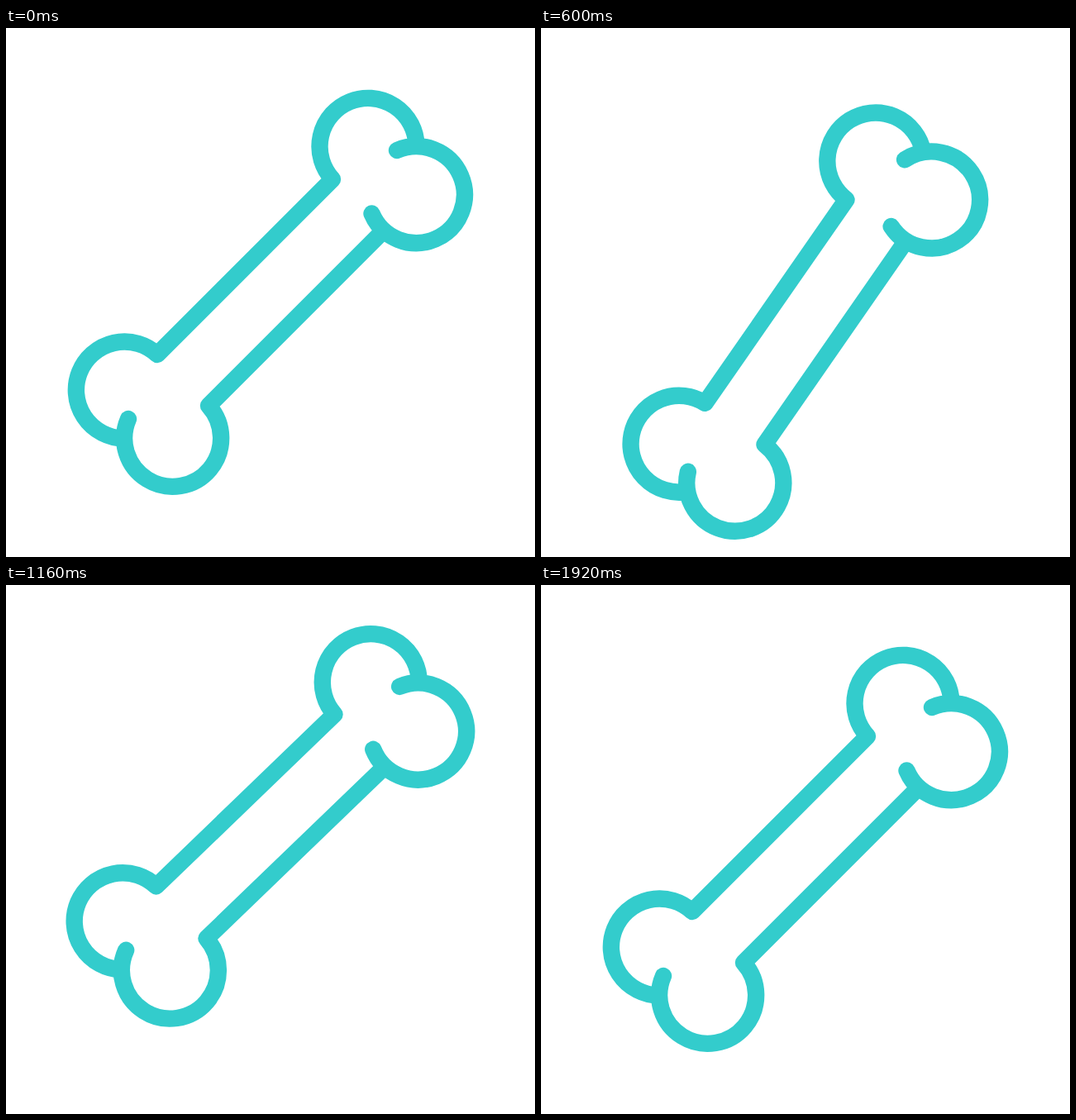
These frames come from a looping animation (640x640 px, 2400 ms). An HTML page:

```html
<!DOCTYPE html>
<html lang="en">
<head>
<meta charset="utf-8">
<title>Bone</title>
<style>
html, body { margin: 0; width: 100%; height: 100%; overflow: hidden; background: #fff; }
svg { display: block; width: 100%; height: 100%; }
path { fill: none; stroke: #3cc; stroke-width: 20.4; stroke-linecap: round; stroke-linejoin: round; }
</style>
</head>
<body>
<svg viewBox="-320 -320 640 640">
  <path id="sparks" transform="rotate(-4)"/>
  <path id="bone" d="M176.5-178A58.5 58.5 0 1 0 75-137L-137 75A58.5 58.5 0 1 0-178 176.5
    M-172 153A58.5 58.5 0 1 0-75 137L136-74
    M153-172A58.5 58.5 0 1 1 122.5-95.5"/>
</svg>
<script>
const LOOP = 2400, STEP = 20;
const bone = document.getElementById('bone');
const sparks = document.getElementById('sparks');

// Keys are [ms, value]
const turn = [[0, 0], [380, 14.9], [440, 14.9], [680, -19], [990, 13.3], [1334, -11.6], [1640, 7.4], [1920, 0]];
const lift = [[0, 0], [648, 36.3], [1300, -36.6], [1920, 0]];

// Each spark runs outward along a line, mirrored through the centre
const rays = [
  { x: -52, y: 0, dx: 0, dy: -1, from: 153, to: 215, delay: 0 },
  { x: 0, y: 0, dx: -.702, dy: -.712, from: 169.6, to: 244.6, delay: 40 },
  { x: 0, y: -53.5, dx: -1, dy: 0, from: 153, to: 215, delay: 40 }
];
const HEAD = 742, TAIL = 796, RUN = 240;

function ease(u) {
  u = Math.min(1, Math.max(0, u));
  return u * u * (3 - 2 * u);
}

function at(keys, t) {
  const i = keys.findIndex(k => k[0] > t);
  if (i < 0) return keys[keys.length - 1][1];
  const [t0, a] = keys[i - 1], [t1, b] = keys[i];
  return a + (b - a) * ease((t - t0) / (t1 - t0));
}

function sparkPath(t) {
  let d = '';
  for (const r of rays) {
    const head = ease((t - r.delay - HEAD) / RUN);
    const tail = ease((t - r.delay - TAIL) / RUN);
    if (head === 0 || tail === 1) continue;
    const point = (p, side) => {
      const s = r.from + (r.to - r.from) * p;
      return side * (r.x + r.dx * s) + ' ' + side * (r.y + r.dy * s);
    };
    for (const side of [1, -1]) d += `M${point(tail, side)}L${point(head, side)}`;
  }
  return d;
}

const start = performance.now();

function draw(now) {
  const t = Math.floor(Math.max(0, now - start) % LOOP / STEP) * STEP;
  bone.setAttribute('transform', `translate(0 ${at(lift, t)}) rotate(${at(turn, t)})`);
  sparks.setAttribute('d', sparkPath(t));
  requestAnimationFrame(draw);
}
draw(start);
</script>
</body>
</html>
```
